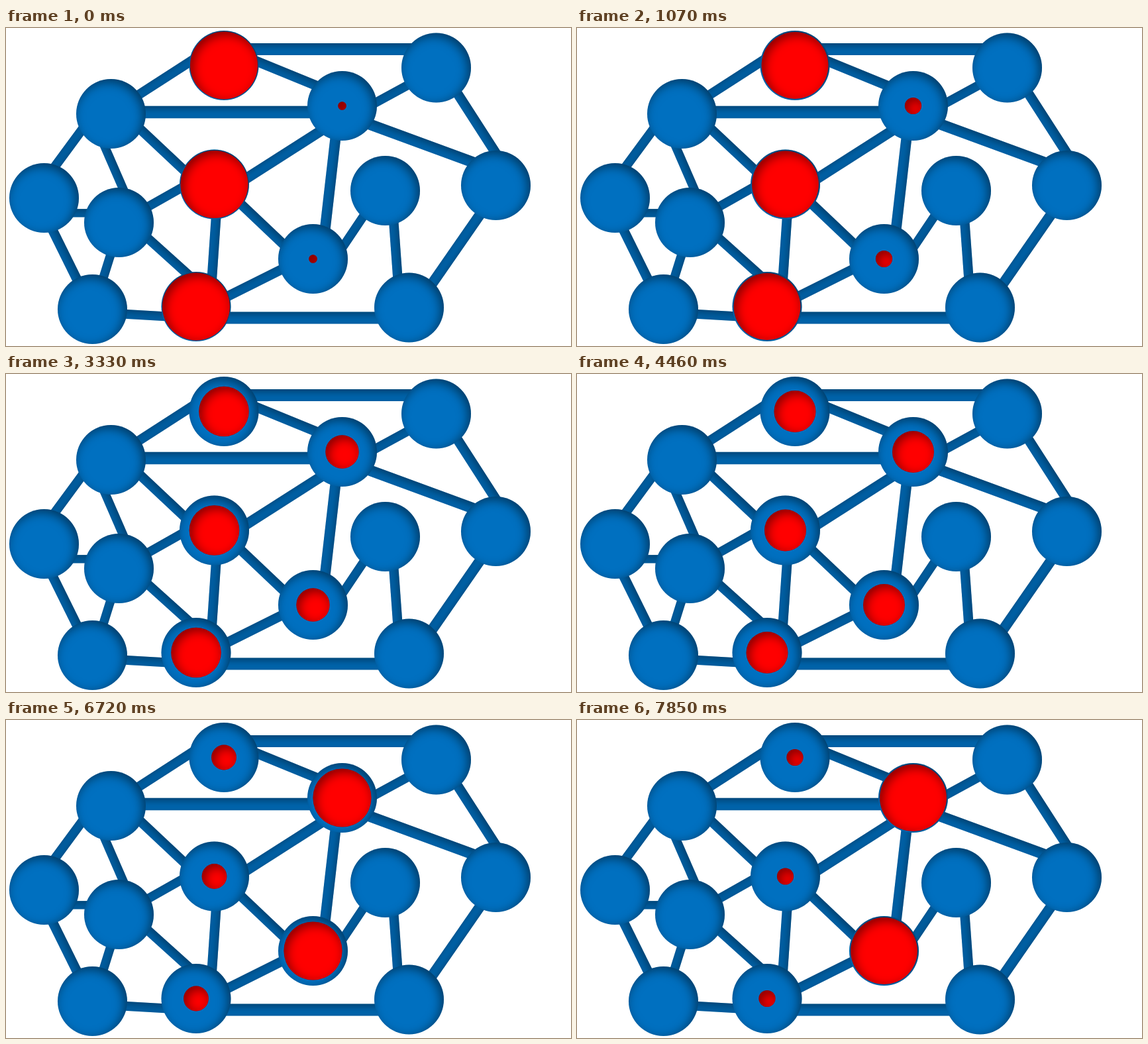
An HTML page with a canvas that plays this animation: 853 px wide and 480 px high, repeating every 8000 ms.

```html
<!DOCTYPE html>
<html lang="en">
<head>
<meta charset="utf-8">
<title>Node network</title>
<style>
html, body { margin: 0; width: 100%; height: 100%; overflow: hidden; background: #fff; }
canvas { display: block; }
</style>
</head>
<body>
<canvas id="stage" width="853" height="480"></canvas>
<script>
const W = 853, H = 480, LOOP = 8000, FIRST = 1070, STEP = 1130;
const NODE_R = 52.5, MAX_R = 51, UNIT = 6.3;

// Inner shadow: x shift gives the side the shade falls on
const BLUE = { color: '#0070c0', shadeX: -4 };
const RED = { color: '#ff0000', shadeX: 4 };
const SHADE_Y = 4.5, SHADE_BLUR = 16;

const nodes = {
  A: [329, 56.5], B: [314.5, 236], C: [287, 420.5], D: [507.5, 117.5], E: [463.5, 348.5],
  F: [649.5, 60], G: [739.5, 237.5], H: [572.5, 245.5], I: [608.5, 422],
  J: [158.5, 129.5], K: [57.5, 256.5], L: [170.5, 293.5], M: [130.5, 424.5]
};

// Node pair, then how far the bar sits beside each centre
const links = [
  ['AF', -24.5, -28], ['JD', -2.5, 9.5], ['CI', 17, 15.5], ['KL', 24, -15], ['JA', -1.5, -33],
  ['AD', -24.5, -13.5], ['DF', 20, 2.5], ['FG', -6, -26.5], ['DG', 12, -21], ['JK', 21, 15],
  ['JL', 30, -27.5], ['JB', -13.5, 16], ['LB', 1, -20], ['BD', 18.5, 14.5], ['BC', -6, -21],
  ['BE', -6, 15], ['CE', 7.5, -7], ['DE', 4.5, -13], ['EH', 28, -6], ['HI', -9.5, 14],
  ['GI', -5.5, -8], ['KM', 10, 1], ['LM', -2.5, -1.5], ['LC', -11.5, -28], ['MC', 4.5, 17.5]
];

function fillShaded(ctx, shape, { color, shadeX }) {
  const far = 3000;
  ctx.fillStyle = color;
  ctx.fill(shape);
  ctx.save();
  ctx.clip(shape);
  // only the shadow of this far-off frame reaches the stage
  const frame = new Path2D();
  frame.rect(-200 - far, -200, W + 400, H + 400);
  frame.addPath(shape, new DOMMatrix([1, 0, 0, 1, -far, 0]));
  ctx.shadowColor = 'rgba(0,0,0,0.5)';
  ctx.shadowBlur = SHADE_BLUR;
  ctx.shadowOffsetX = far + shadeX;
  ctx.shadowOffsetY = SHADE_Y;
  ctx.fillStyle = '#000';
  ctx.fill(frame, 'evenodd');
  ctx.restore();
}

function disc(ctx, [x, y], r, paint) {
  const p = new Path2D();
  p.arc(x, y, r, 0, Math.PI * 2);
  fillShaded(ctx, p, paint);
}

function link(ctx, [pair, side1, side2]) {
  const [[x1, y1], [x2, y2]] = [...pair].map(name => nodes[name]);
  const len = Math.hypot(x2 - x1, y2 - y1);
  const nx = (y1 - y2) / len, ny = (x2 - x1) / len;
  const half = (10 + len / 40) / 2; // longer bars are thicker
  const p = new Path2D();
  p.moveTo(x1 + nx * (side1 - half), y1 + ny * (side1 - half));
  p.lineTo(x2 + nx * (side2 - half), y2 + ny * (side2 - half));
  p.lineTo(x2 + nx * (side2 + half), y2 + ny * (side2 + half));
  p.lineTo(x1 + nx * (side1 + half), y1 + ny * (side1 + half));
  p.closePath();
  fillShaded(ctx, p, BLUE);
}

function makeNetwork() {
  const layer = document.createElement('canvas');
  layer.width = W;
  layer.height = H;
  const ctx = layer.getContext('2d');
  ctx.fillStyle = '#fff';
  ctx.fillRect(0, 0, W, H);
  links.forEach(l => link(ctx, l));
  Object.values(nodes).forEach(n => disc(ctx, n, NODE_R, BLUE));
  return layer;
}

const stage = document.getElementById('stage').getContext('2d');
const network = makeNetwork();
let shown = -1;

function draw(step) {
  const pulse = (names, r) => {
    for (const name of names) disc(stage, nodes[name], Math.min(MAX_R, r), RED);
  };
  stage.drawImage(network, 0, 0);
  pulse('ABC', UNIT * (9 - step));
  pulse('DE', UNIT * (step + 1));
}

const start = performance.now();
function tick() {
  const t = (performance.now() - start) % LOOP;
  const step = t < FIRST ? 0 : 1 + Math.floor((t - FIRST) / STEP);
  if (step !== shown) {
    shown = step;
    draw(step);
  }
  requestAnimationFrame(tick);
}
tick();
</script>
</body>
</html>
```
